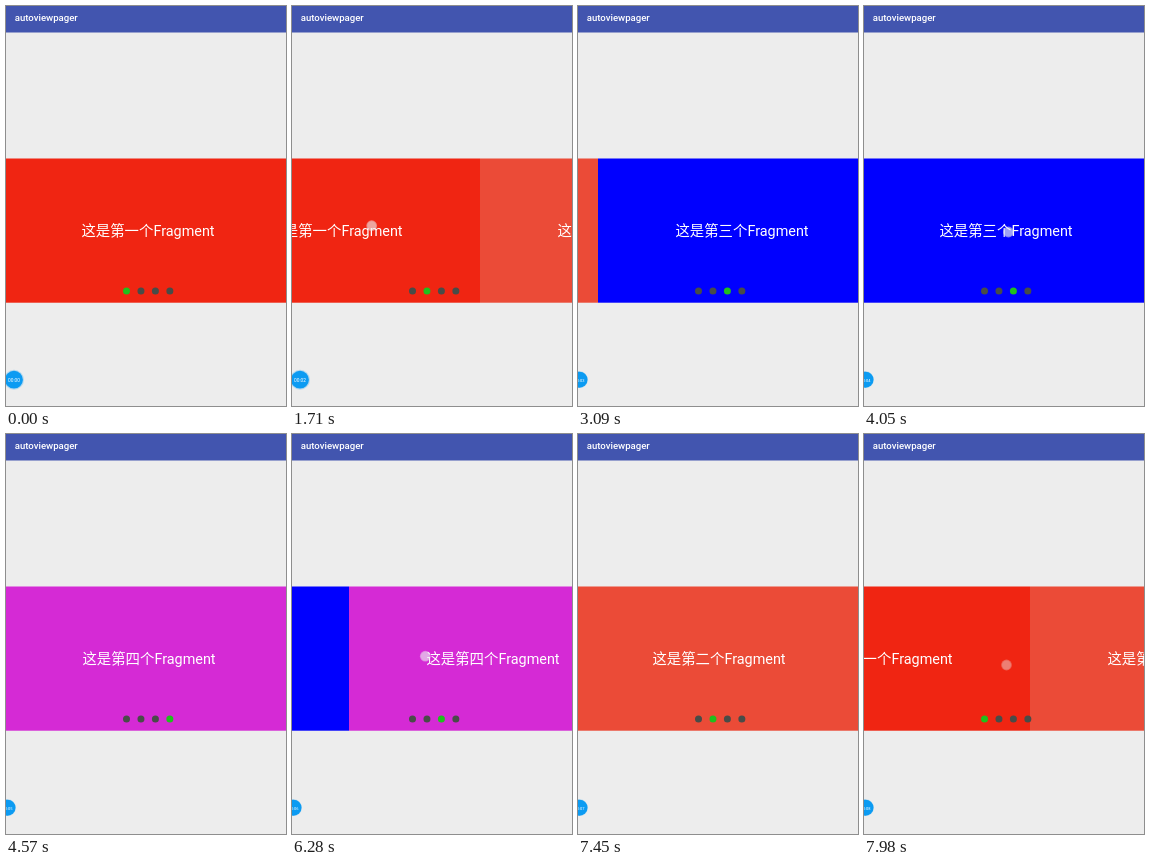
These frames come from a looping animation (280 by 400 pixels, 8000 ms). An HTML page with a canvas:

```html
<!DOCTYPE html>
<html lang="zh-CN">
<head>
<meta charset="utf-8">
<style>
  html, body { margin: 0; width: 100%; height: 100%; overflow: hidden; background: #ededed; }
  canvas { display: block; }
</style>
</head>
<body>
<canvas id="stage" width="280" height="400"></canvas>
<script>
const ctx = document.getElementById('stage').getContext('2d');
const LOOP = 8000, PAGE = 288, LEFT = -2, TOP = 152.5, HEIGHT = 144.2;
const SLOP = 8, SETTLE = 550, FADE = 160;
const FONT = 'Roboto, "Noto Sans CJK SC", "Noto Sans CJK", sans-serif';

const pages = [
  ['#f02512', '一'], ['#eb4b37', '二'], ['#0000ff', '三'], ['#d52ad5', '四']
];

// drag: share of a page pulled by the finger before release; x, y: release point
const swipes = [
  { down: 1510, up: 1700, from: 0, to: 1, drag: .271, x: 79.7, y: 219.7 },
  { down: 2570, up: 2900, from: 1, to: 2, drag: .35, x: 65, y: 224 },
  { down: 4050, up: 4190, from: 2, to: 3, drag: .25, x: 65, y: 226 },
  { down: 6160, up: 6270, from: 3, to: 2, drag: .121, x: 133.3, y: 222.2 },
  { down: 6970, up: 7070, from: 2, to: 1, drag: .177, x: 130.4, y: 228 },
  { down: 7780, up: 7915, from: 1, to: 0, drag: .211, x: 142.5, y: 231 }
];

const clamp = v => Math.min(1, Math.max(0, v));

function circle(x, y, r, fill) {
  ctx.fillStyle = fill;
  ctx.beginPath();
  ctx.arc(x, y, r, 0, 7);
  ctx.fill();
}

function text(str, x, y, size, weight = 400) {
  ctx.font = `${weight} ${size}px ${FONT}`;
  ctx.fillStyle = '#fff';
  ctx.fillText(str, x, y);
}

function pagerState(t) {
  const state = { position: 0, selected: 0, touch: null };
  for (const s of swipes) {
    if (t < s.down) break;
    const travel = s.drag * PAGE + SLOP;
    const u = clamp((t - s.down) / (s.up - s.down));
    const dir = s.to - s.from;
    const pulled = Math.max(0, travel * u - SLOP) / PAGE;
    const settle = 1 - (1 - clamp((t - s.up) / SETTLE)) ** 5;
    state.position = s.from + dir * (pulled + (1 - pulled) * settle);
    state.selected = t < s.up ? s.from : s.to;
    state.touch = {
      x: s.x + dir * travel * (1 - u),
      y: s.y,
      alpha: 1 - clamp((t - s.up) / FADE)
    };
  }
  return state;
}

function drawPager(t) {
  const { position, selected, touch } = pagerState(t);
  ctx.textAlign = 'center';
  pages.forEach(([color, numeral], i) => {
    const x = Math.round(LEFT + (i - position) * PAGE);
    if (x > 280 || x < -PAGE) return;
    ctx.fillStyle = color;
    ctx.fillRect(x, TOP, PAGE, HEIGHT);
    text(`这是第${numeral}个Fragment`, x + PAGE / 2, 230.3, 14.4);
  });
  pages.forEach((_, i) =>
    circle(120.5 + i * 14.45, 285, 3.5, i === selected ? '#1fc01c' : '#484c48'));
  if (touch && touch.alpha > 0) {
    circle(touch.x, touch.y, 5.4, `rgba(235,240,240,${touch.alpha * .5})`);
    circle(touch.x, touch.y, 4.5, `rgba(235,240,240,${touch.alpha * .35})`);
  }
}

// Floating timer that shrinks and docks to the left edge
function drawTimer(t) {
  const dock = clamp((t - 2750) / 250);
  const x = 8 - 6.5 * dock, y = 373.7;
  const seconds = t < 690 ? 0 : 1 + Math.floor((t - 690) / 966);
  circle(x, y, 10 - 1.6 * dock, '#b5d9ee');
  circle(x, y, 8.9 - .9 * dock, '#0c9bf2');
  ctx.textAlign = 'center';
  text('00:0' + seconds, x, y + 2, 4.8 - .8 * dock);
}

function draw(t) {
  ctx.fillStyle = '#ededed';
  ctx.fillRect(0, 0, 280, 400);
  ctx.fillStyle = '#4255af';
  ctx.fillRect(0, 0, 280, 26.5);
  ctx.textAlign = 'left';
  text('autoviewpager', 8.7, 15, 9.6, 500);
  drawPager(t);
  drawTimer(t);
}

const start = performance.now();
function tick() {
  draw((performance.now() - start) % LOOP);
  requestAnimationFrame(tick);
}
tick();
</script>
</body>
</html>
```
